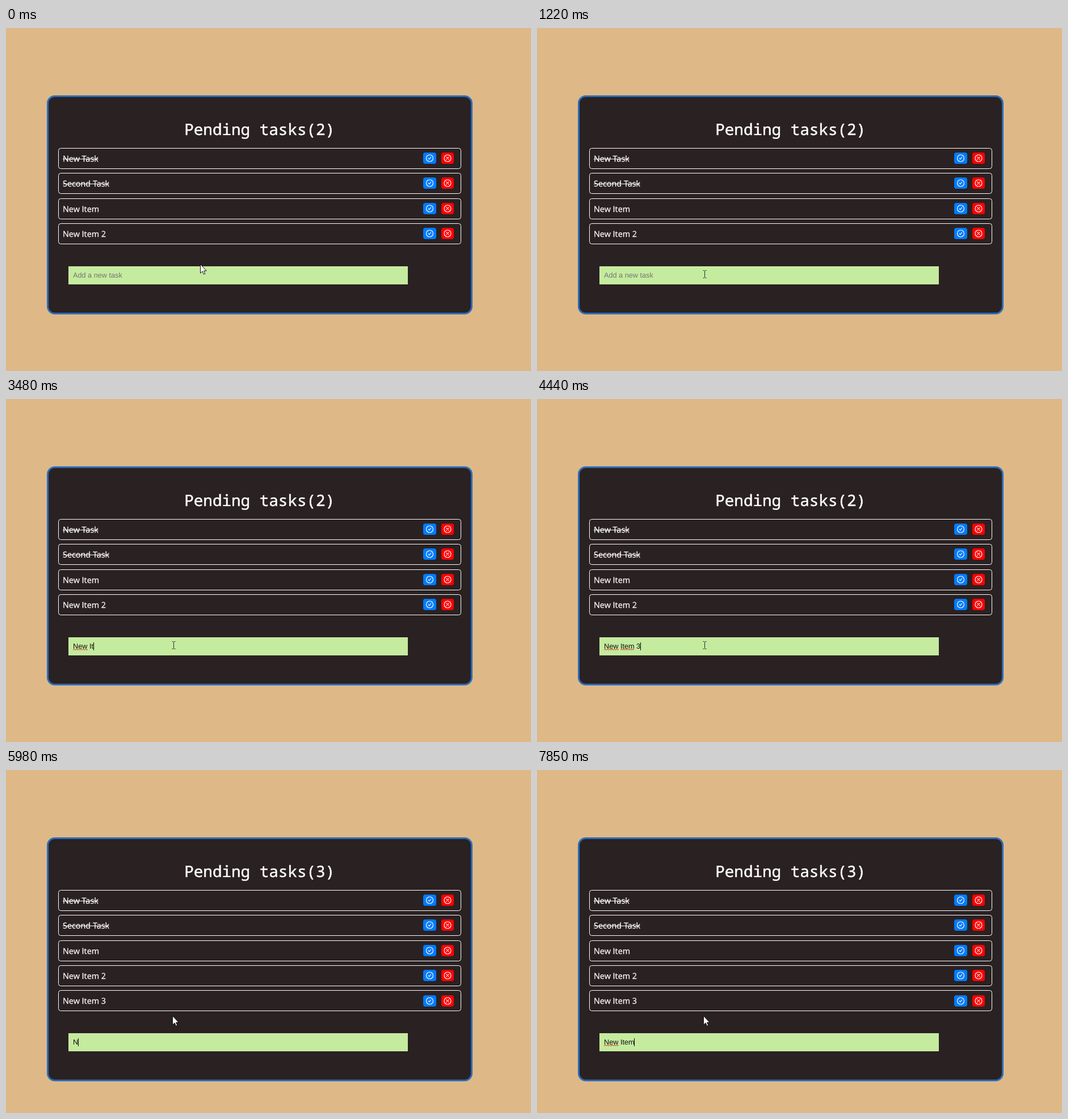
Recreate the animation shown at these times as an HTML page. Size 925 px wide and 606 px high, loop 8 s.

```html
<!DOCTYPE html>
<html lang="en">
<head>
<meta charset="utf-8">
<title>Pending tasks</title>
<style>
  html, body { margin: 0; width: 100%; height: 100%; overflow: hidden; background: #deb887; }
  svg { display: block; width: 100%; height: 100%; }
  text { white-space: pre; text-rendering: geometricPrecision; }
  .title { font: 27.6px "Noto Sans Mono", monospace; fill: #fff; stroke: #fff; stroke-width: .5; text-anchor: middle; }
  .label { font: 14.4px "Open Sans", sans-serif; fill: #fff; stroke: #fff; stroke-width: .25; }
  .field { font: 12.7px "Liberation Sans", Arial, sans-serif; fill: #111; }
  .hint { fill: #757575; }
  .icon { fill: none; stroke: #fff; stroke-width: 1.15; stroke-linecap: round; stroke-linejoin: round; }
</style>
</head>
<body>
<svg id="stage" viewBox="0 0 925 606">
  <rect width="925" height="606" fill="#deb887"/>
  <rect id="card" x="73.5" y="120.5" width="747" rx="12.5" fill="#2a2122" stroke="#2a6dbb" stroke-width="3"/>
  <text id="title" class="title" x="446.7" y="189"></text>
  <g id="rows"></g>
  <g id="form">
    <rect x="110" y="421" width="598" height="32" fill="#c5eb9f"/>
    <circle id="click" cx="293" cy="434" r="14" fill="#e2f241"/>
    <text id="hint" class="field hint" x="118" y="441">Add a new task</text>
    <path id="waves" fill="none" stroke="#e81c1c" stroke-width="1"/>
    <text id="typed" class="field" x="118" y="441"></text>
    <rect id="caret" y="430" width="1" height="14" fill="#000"/>
  </g>
  <path id="arrow" d="M.5 .5V16.2L4.1 12.8L6.5 18.2L8.8 17.2L6.5 12H11.2Z" fill="#fff" stroke="#111" stroke-width="1"/>
  <path id="beam" d="M-3 -6.5H-1L0 -5.5L1 -6.5H3M0 -5.5V5.5M-3 6.5H-1L0 5.5L1 6.5H3" fill="none" stroke="#2b2b2b" stroke-width="1"/>
</svg>
<script>
const LOOP = 8000, ADDED = 4990, PITCH = 44.4, LEFT = 118;
const $ = id => document.getElementById(id);
const show = (el, on) => el.setAttribute("visibility", on ? "visible" : "hidden");
const [card, title, rows, form, click, hint, waves, typed, caret, arrow, beam] =
  ["card", "title", "rows", "form", "click", "hint", "waves", "typed", "caret", "arrow", "beam"].map($);

// [start, text in the field]
const typing = [
  [0, ""], [1850, "N"], [2170, "Ne"], [2320, "New"], [2470, "New "], [3100, "New I"],
  [3480, "New It"], [3650, "New Ite"], [3800, "New Item"], [3970, "New Item "], [4440, "New Item 3"],
  [ADDED, ""], [5980, "N"], [6380, "Ne"], [6610, "New"], [6760, "New "], [7220, "New I"],
  [7620, "New It"], [7770, "New Ite"], [7850, "New Item"]
];
const caretOff = [[0, 690], [1220, 1770], [3020, 3100], [5520, 5980]];
// [start, x, y, kind]
const pointer = [
  [0, 342, 417, "arrow"], [70, 337, 404, "arrow"], [150, 327, 395, "arrow"], [230, 315, 393, "arrow"],
  [300, 305, 400, "arrow"], [380, 298, 412, "arrow"], [450, 296, 429, "beam"], [530, 295, 435, "beam"],
  [ADDED, 293, 434, "arrow"]
];
const at = (list, t) => list.findLast(step => step[0] <= t);

function makeRow(name, i, done) {
  const top = Math.round(211.8 + PITCH * i);
  const base = top + 24;
  const mid = Math.round(230 + PITCH * i);
  const width = done ? (i ? 81.5 : 62.5) : 0;
  const button = (x, w, fill, mark) => `
    <rect x="${x}" y="${mid - 10}" width="${w}" height="20" rx="4" fill="${fill}"/>
    <g class="icon" transform="translate(${x + w / 2} ${mid})"><circle r="6"/><path d="${mark}"/></g>`;
  return `<g>
    <rect x="92.5" y="${top + .5}" width="709" height="36" rx="4" fill="none" stroke="#fff"/>
    <text class="label" x="100" y="${base}">${name}</text>
    <rect x="100" y="${base - 5}" width="${width}" height="1" fill="#fff"/>
    ${button(735, 23, "#007bff", "M-2.3 .2L-.7 1.8L2.2 -2")}
    ${button(767, 22, "#f00", "M-2.2 -2.2L2.2 2.2M2.2 -2.2L-2.2 2.2")}
  </g>`;
}
rows.innerHTML = ["New Task", "Second Task", "New Item", "New Item 2", "New Item 3"]
  .map((name, i) => makeRow(name, i, i < 2)).join("");
const newRow = rows.lastElementChild;

function wave(from, to) {
  let d = `M${from} 443.5`;
  for (let x = from + 2, up = true; x <= to; x += 2, up = !up) d += `L${x} ${up ? 441.8 : 443.5}`;
  return d;
}

function draw(t) {
  const added = t >= ADDED;
  const text = at(typing, t)[1];
  const [, x, y, kind] = at(pointer, t);

  card.setAttribute("height", added ? 428 : 384);
  title.textContent = `Pending tasks(${added ? 3 : 2})`;
  show(newRow, added);
  form.setAttribute("transform", `translate(0 ${added ? 44 : 0})`);

  typed.textContent = text;
  show(hint, !text);
  const width = text ? typed.getComputedTextLength() : 0;
  caret.setAttribute("x", Math.floor(LEFT + width + .05));
  show(caret, !caretOff.some(([a, b]) => t >= a && t < b));
  waves.setAttribute("d",
    (text.length > 3 ? wave(LEFT, 144) : "") + (text.length > 8 ? wave(147, 171) : ""));

  show(click, t >= 600 && t < 690);
  show(arrow, kind === "arrow");
  show(beam, kind === "beam");
  arrow.setAttribute("transform", `translate(${x} ${y})`);
  beam.setAttribute("transform", `translate(${x + .5} ${y})`);
}

const start = performance.now();
function tick() {
  draw((performance.now() - start) % LOOP);
  requestAnimationFrame(tick);
}
tick();
</script>
</body>
</html>
```
